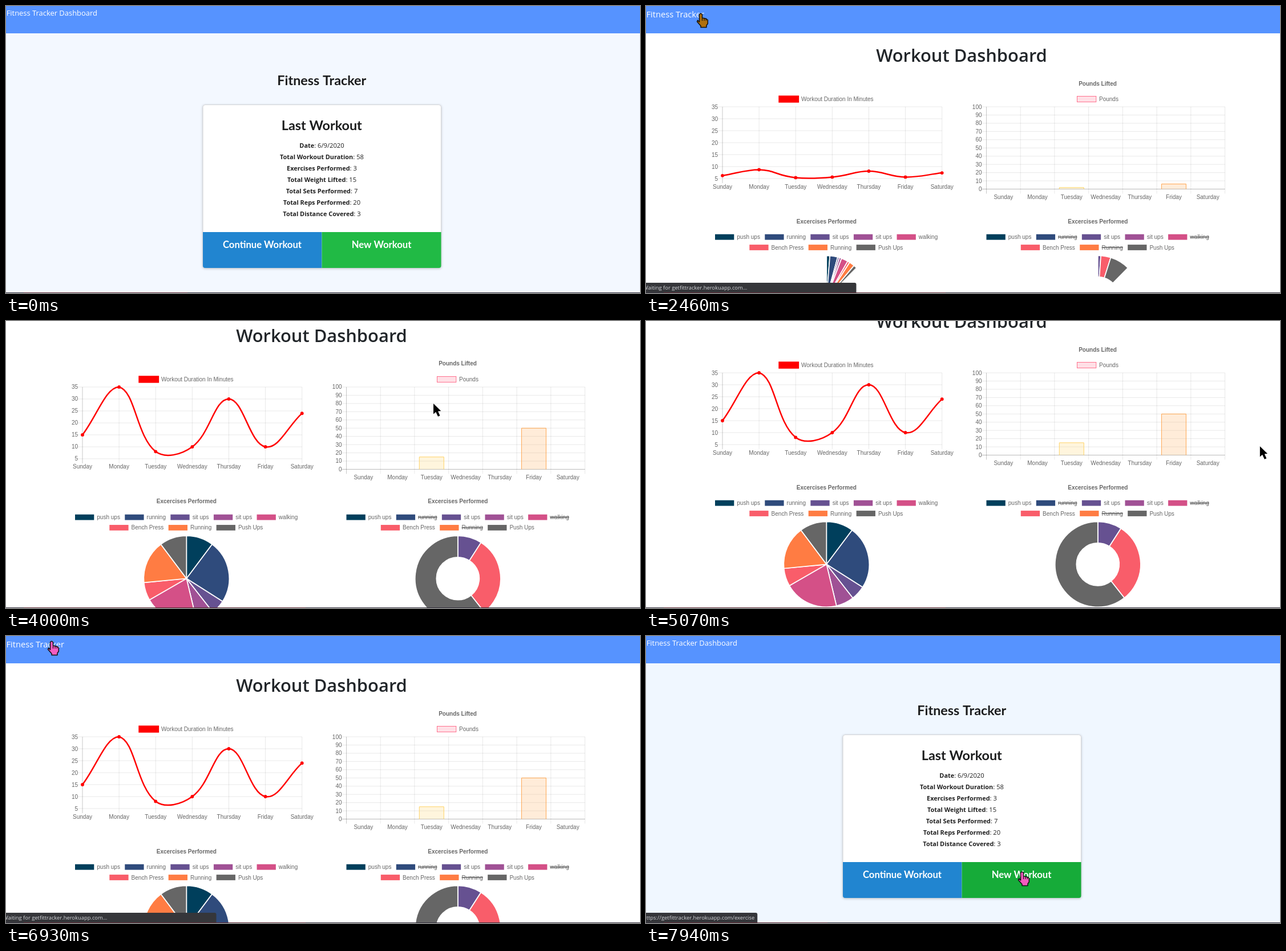
Recreate the animation shown at these times as an HTML page with a canvas. Size 1111 by 504 pixels, loop 8 s.

```html
<!DOCTYPE html>
<html lang="en">
<head>
<meta charset="utf-8">
<title>Fitness Tracker</title>
<style>
html, body { margin: 0; width: 100%; height: 100%; overflow: hidden; background: #fff; }
canvas { display: block; }
</style>
</head>
<body>
<canvas id="stage" width="1111" height="504"></canvas>
<script>
const c = document.getElementById('stage').getContext('2d');
const LOOP = 8000, TICK = 77.1, FIRST = 290;
const UI = '"Open Sans", "Noto Sans", sans-serif';
const HEAD = 'Lato, sans-serif';
const CHART = '"Liberation Sans", Arial, sans-serif';
const BLUE = '#5693ff', GREY = '#666', HOST = 'getfittracker.herokuapp.com';
const DAYS = ['Sunday', 'Monday', 'Tuesday', 'Wednesday', 'Thursday', 'Friday', 'Saturday'];
const MINUTES = [15, 35, 8, 10, 30, 10, 24];
const EXERCISES = ['push ups', 'running', 'sit ups', 'sit ups', 'walking', 'Bench Press', 'Running', 'Push Ups'];
const COLORS = ['#003f5c', '#2f4b7c', '#665191', '#a05195', '#d45087', '#f95d6a', '#ff7c43', '#666'];
const SUMMARY = [['Date', '6/9/2020'], ['Total Workout Duration', 58], ['Exercises Performed', 3],
  ['Total Weight Lifted', 15], ['Total Sets Performed', 7], ['Total Reps Performed', 20],
  ['Total Distance Covered', 3]];

// Pointer path: time, x, y
const PATH = [[290, 985, 485], [1060, 467, 198], [1140, 467, 198], [1480, 96, 13], [2530, 96, 13],
  [3150, 640, 200], [3480, 745, 137], [3700, 749, 145], [4600, 749, 145], [5070, 1076, 218],
  [5390, 1070, 298], [6130, 1070, 298], [6620, 80, 9], [7000, 80, 9], [7310, 447, 68],
  [7540, 612, 332], [7920, 659, 414], [8000, 659, 414]];

const clamp = (v, lo = 0, hi = 1) => Math.min(hi, Math.max(lo, v));
const ramp = (t, a, b) => clamp((t - a) / (b - a));

function text(s, x, y, font, color, align = 'left') {
  c.font = font;
  c.fillStyle = color;
  c.textAlign = align;
  c.fillText(s, x, y);
}

function rect(x, y, w, h, color) {
  c.fillStyle = color;
  c.fillRect(x, y, w, h);
}

function line(x1, y1, x2, y2, color = 'rgba(0,0,0,.1)', width = 0.9) {
  c.strokeStyle = color;
  c.lineWidth = width;
  c.beginPath();
  c.moveTo(x1, y1);
  c.lineTo(x2, y2);
  c.stroke();
}

const label = (s, x, y, align, bold = '') => text(s, x, y + 3.5, bold + '10px ' + CHART, GREY, align);

function pointer(t) {
  if (t < PATH[0][0]) return null;
  const i = PATH.findIndex(p => p[0] > t);
  const [a, b] = [PATH[i - 1], PATH[i]], k = ramp(t, a[0], b[0]);
  return { x: a[1] + (b[1] - a[1]) * k, y: a[2] + (b[2] - a[2]) * k };
}

function drawArrow(p, color) {
  c.fillStyle = color;
  c.beginPath();
  [[0, 0], [0, 18.5], [4.2, 14.8], [8, 22.8], [11.5, 21.2], [8, 13.4], [13.2, 13]]
    .forEach(([x, y]) => c.lineTo(p.x + x, p.y + y));
  c.fill();
}

function drawHand(p, color) {
  c.save();
  c.translate(p.x, p.y);
  c.beginPath();
  c.moveTo(-2.5, 15);
  c.lineTo(-2.5, 2);
  c.quadraticCurveTo(0, -1.5, 2.5, 2);
  [[2.5, 8], [6, 8.5], [9.5, 9.5], [12.3, 11.5], [12.3, 18], [10, 21], [10, 24.5], [0, 24.5], [0, 22],
    [-6.5, 14.5], [-5.5, 12]].forEach(q => c.lineTo(...q));
  c.closePath();
  c.fillStyle = color;
  c.fill();
  c.strokeStyle = '#111';
  c.lineWidth = 1.5;
  c.lineJoin = 'round';
  c.stroke();
  for (const x of [2.5, 6, 9.3]) line(x, 8.5, x, 13, '#111', 1.1);
  c.restore();
}

function drawStatus(s) {
  c.font = '9.4px ' + UI;
  const w = s.startsWith('W') ? 368.5 : c.measureText(s).width;
  c.fillStyle = '#35363a';
  c.beginPath();
  c.roundRect(-5, 486, w + 5, 20, [0, 3, 0, 0]);
  c.fill();
  text(s, -5, 498, c.font, '#d4d6da');
}

function drawHome(t, p) {
  const loaded = t < 5000 || t > 7440;
  const top = loaded ? 397 : 249.5, bottom = top + 63;
  rect(0, 0, 1111, 504, t < 5000 ? '#f3f8ff' : '#f0f7ff');
  rect(0, 0, 1111, 48, BLUE);
  text('Fitness Tracker Dashboard', 160, 16.5, '12.95px ' + UI, '#fff', 'right');
  const title = 'bold 23.33px ' + HEAD;
  text('Fitness Tracker', 553.3, 139, title, '#1b1c1d', 'center');

  c.save();
  c.beginPath();
  c.roundRect(345, 173.5, 417.5, bottom - 173.5, 4);
  c.shadowColor = 'rgba(34,36,38,.3)';
  c.shadowBlur = 4;
  c.shadowOffsetY = 1;
  c.fillStyle = '#fff';
  c.fill();
  c.shadowColor = 'transparent';
  c.strokeStyle = '#d4d5d8';
  c.lineWidth = 1;
  c.stroke();
  c.clip();
  const over = p && p.y > top && p.y < bottom && p.x > 553.5 && p.x < 762;
  rect(345, top, 208.5, 63, '#2185d0');
  rect(553.5, top, 210, 63, over ? '#16ab39' : '#21ba45');
  c.restore();

  text('Last Workout', 553.3, 218, title, '#1b1c1d', 'center');
  const button = 'bold 16.67px ' + HEAD;
  text('Continue Workout', 449, top + 28, button, '#fff', 'center');
  text('New Workout', 658, top + 28, button, '#fff', 'center');
  if (loaded) SUMMARY.forEach(([name, value], i) => {
    const bold = 'bold 10.9px ' + UI, plain = '11.2px ' + UI, rest = ': ' + value;
    c.font = bold;
    const w = c.measureText(name).width;
    c.font = plain;
    const x = 553.5 - (w + c.measureText(rest).width) / 2, y = 248.5 + 20 * i;
    text(name, x, y, bold, '#212121');
    text(rest, x + w, y, plain, '#212121');
  });
  return over || (p && p.y < 26 && p.x > 90 && p.x < 160);
}

function drawLineChart(grow) {
  const left = 134, right = 518.7, top = 177, base = 303, step = (right - left) / 6;
  rect(232.3, 157.3, 35.8, 12.4, '#f00');
  label('Workout Duration In Minutes', 272, 163.5);
  for (let i = 0; i < 7; i++) {
    const x = left + step * i, y = base - 21 * i;
    line(x, top, x, base + 8, i ? undefined : 'rgba(0,0,0,.25)');
    line(left - 8, y, right, y);
    label(5 + 5 * i, left - 8, y, 'right');
    label(DAYS[i], x, 317, 'center');
  }
  const pts = MINUTES.map((v, i) => ({ x: left + step * i, y: base - (v - 5) * 4.2 }));
  const scale = y => base - (base - clamp(y, top, base)) * grow;
  // Spline handles as in a cubic curve with tension 0.4
  const handles = pts.map((q, i) => {
    const a = pts[i - 1] || q, b = pts[i + 1] || q;
    const da = Math.hypot(q.x - a.x, q.y - a.y), db = Math.hypot(b.x - q.x, b.y - q.y);
    const at = k => [q.x + k * (b.x - a.x), scale(q.y + k * (b.y - a.y))];
    return [at(-0.4 * da / (da + db)), at(0.4 * db / (da + db))];
  });
  c.strokeStyle = c.fillStyle = '#f00';
  c.lineWidth = 2.5;
  c.beginPath();
  pts.forEach((q, i) => i
    ? c.bezierCurveTo(...handles[i - 1][1], ...handles[i][0], q.x, scale(q.y))
    : c.moveTo(q.x, scale(q.y)));
  c.stroke();
  for (const q of pts) {
    c.beginPath();
    c.arc(q.x, scale(q.y), 2.9, 0, 7);
    c.fill();
  }
}

function drawBarChart(grow) {
  const left = 596.5, right = 1014.5, top = 177, base = 321.5, step = (right - left) / 7;
  label('Pounds Lifted', 791.5, 136, 'center', 'bold ');
  rect(755.5, 158.5, 33.3, 10, 'rgba(255,99,132,.2)');
  c.strokeStyle = 'rgb(255,99,132)';
  c.lineWidth = 0.9;
  c.strokeRect(755.5, 158.5, 33.3, 10);
  label('Pounds', 794, 163.5);
  for (let i = 0; i <= 10; i++) {
    const y = base - 14.45 * i;
    line(left - 8, y, right, y, i ? undefined : 'rgba(0,0,0,.3)');
    label(10 * i, left - 8, y, 'right');
  }
  for (let i = 0; i < 8; i++) {
    const x = left + step * i;
    line(x, top, x, base + 8, i ? undefined : 'rgba(0,0,0,.25)');
    if (i < 7) label(DAYS[i], x + step / 2, 335.5, 'center');
  }
  for (const [day, value, rgb] of [[2, 15, '255,206,86'], [5, 50, '255,159,64']]) {
    const w = step * 0.72, x = left + step * (day + 0.5) - w / 2, h = value * 1.445 * grow;
    rect(x, base - h, w, h, `rgba(${rgb},.2)`);
    c.strokeStyle = `rgb(${rgb})`;
    c.lineWidth = 0.9;
    c.beginPath();
    c.moveTo(x, base);
    c.lineTo(x, base - h);
    c.lineTo(x + w, base - h);
    c.lineTo(x + w, base);
    c.stroke();
  }
}

function drawPie(cx, values, inner, grow) {
  const cy = 513.3, total = values.reduce((a, b) => a + b);
  label('Excercises Performed', cx, 378, 'center', 'bold ');
  let x = cx - 195.3, y = 405.7;
  EXERCISES.forEach((name, i) => {
    if (i === 5) { x = cx - 135; y = 424; }
    rect(x, y - 4.9, 33.3, 9.8, COLORS[i]);
    label(name, x + 38.3, y);
    const w = c.measureText(name).width;
    if (inner && [1, 4, 6].includes(i)) line(x + 38.3, y, x + 38.3 + w, y, GREY, 1.6);
    x += 46.7 + w;
  });
  let from = -Math.PI / 2;
  c.strokeStyle = '#fff';
  c.lineWidth = 1.7;
  c.lineJoin = 'bevel';
  values.forEach((v, i) => {
    if (!v) return;
    const to = from + v / total * grow * 2 * Math.PI;
    c.beginPath();
    c.arc(cx, cy, 75, from, to);
    c.arc(cx, cy, inner, to, from, true);
    c.closePath();
    c.fillStyle = COLORS[i];
    c.fill();
    c.stroke();
    from = to;
  });
}

function drawDashboard(t, p) {
  const scroll = 86 * (ramp(t, 3800, 4080) - ramp(t, 5480, 5700));
  rect(0, 0, 1111, 504, '#fff');
  c.save();
  c.translate(0, -scroll);
  rect(0, 0, 1111, 48, BLUE);
  text('Fitness Tracker', 102, 20, '14.7px ' + UI, '#fff', 'right');
  text('Workout Dashboard', 553, 98, '600 30.9px ' + UI, '#212529', 'center');
  if (t > 2440) {
    const grow = 1 - (1 - ramp(t, 2421, 3521)) ** 4;
    drawLineChart(grow);
    drawBarChart(grow);
    drawPie(316.3, [15, 35, 8, 10, 30, 10, 24, 15], 0, grow);
    drawPie(791.8, [0, 0, 15, 0, 0, 50, 0, 100], 37.5, grow);
  }
  c.restore();
  return p && p.y < 30 && p.x < 103;
}

function statusText(t) {
  const waiting = 'Waiting for ' + HOST + '...', url = 'https://' + HOST;
  if (t > 1480 && t < 1700) return url + '/stats';
  if (t > 1700 && t < 2760) return waiting;
  if (t > 6770 && t < 6850) return url + '/';
  if (t > 6850 && t < 7500) return waiting;
  if (t > 7810) return url + '/exercise';
}

function frame(now) {
  // The screen updates 13 times a second
  const t = FIRST + Math.floor((now % LOOP - FIRST) / TICK) * TICK + 8;
  const p = pointer(t), home = t < 1990 || t > 7000;
  const hand = home ? drawHome(t, p) : drawDashboard(t, p);
  const status = statusText(t);
  if (status) drawStatus(status);
  rect(0, 503, 1111, 1, '#33303c');
  rect(31, 503, home ? 287 : 494, 1, '#5c2a35');
  if (p && hand) drawHand(p, t < 5000 ? '#b0700f' : '#f45cc0');
  else if (p) drawArrow(p, t > 7000 ? '#123a12' : '#000');
  requestAnimationFrame(frame);
}
requestAnimationFrame(frame);
</script>
</body>
</html>
```
